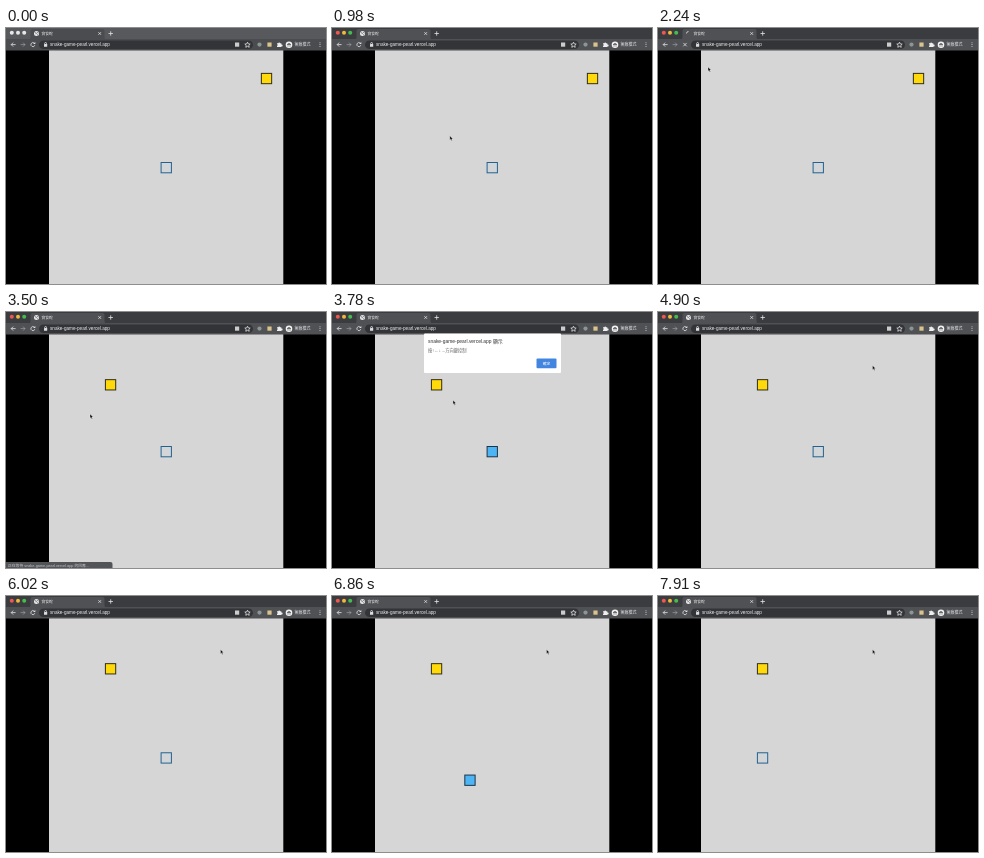
An HTML page for the animation above (8000 ms loop, 320x256 px).

```html
<!DOCTYPE html>
<html lang="zh-Hant">
<head>
<meta charset="utf-8">
<title>貪食蛇</title>
<style>
  html, body { margin: 0; width: 100%; height: 100%; overflow: hidden; background: #000; }
  svg { display: block; width: 100vw; height: 100vh; }
  text { font-family: "Liberation Sans", "Noto Sans CJK TC", "Noto Sans CJK", sans-serif; fill: #eee; }
  .line { fill: none; stroke: #e4e4e4; stroke-width: .8; }
</style>
</head>
<body>
<svg viewBox="0 0 320 256">
  <rect width="320" height="256" fill="#000"/>
  <rect x="43" y="22" width="234.3" height="234" fill="#d6d6d6"/>

  <g id="chrome">
    <rect id="frame" width="320" height="12"/>
    <path id="tab" d="M22 11.5Q24.5 11.5 24.5 9V3Q24.5 1 26.5 1H96.500Q98.500 1 98.500 3V9Q98.500 11.500 101 11.500Z"/>
    <rect id="toolbar" y="11" width="320" height="11.500"/>
    <rect x="33" y="12.500" width="214" height="8.500" rx="4.250" fill="#333438"/>
    <g id="lights"><circle cx="5.800" cy="4.800" r="2"/><circle cx="12" cy="4.800" r="2"/><circle cx="18.200" cy="4.800" r="2"/></g>
    <g id="globe">
      <circle cx="30.500" cy="5.500" r="2.500" fill="#eee"/>
      <path d="M28.800 4.600l1.600.4-.3 1.300M31 3.800l.7 1 .9.300M31 6.500l1 .6" fill="none" stroke="#55565a" stroke-width=".7"/>
    </g>
    <path id="spinner" class="line" d="M28.500 5.500A2 2 0 0 1 30.500 3.500"/>
    <text x="35.500" y="7.200" font-size="3.800">貪食蛇</text>
    <path class="line" d="M92.400 4.200l2.600 2.600m0-2.600l-2.600 2.600" stroke-width=".6"/>
    <path class="line" d="M102.500 5.500h4.400m-2.200-2.200v4.400" stroke-width=".7"/>
    <path class="line" d="M9.600 16.600H5.200m2-2l-2 2 2 2"/>
    <path class="line" d="M14.600 16.600H19m-2-2l2 2-2 2" opacity=".45"/>
    <circle id="hover" cx="27" cy="16.700" r="5" fill="#fff" opacity=".12"/>
    <g id="reload">
      <path class="line" d="M28.800 17.200A2 2 0 1 1 28.300 15.200"/>
      <path d="M29.300 13.900v2.200h-2.200z" fill="#e4e4e4"/>
    </g>
    <path id="stop" class="line" d="M25.300 14.900l3.400 3.400m0-3.400l-3.400 3.400"/>
    <rect x="38" y="16.100" width="3.200" height="2.600" rx=".3" fill="#ddd"/>
    <path d="M38.700 16.200v-.8a.9.900 0 0 1 1.800 0v.8" class="line" stroke-width=".5"/>
    <text x="44" y="18.400" font-size="4.630">snake-game-pearl.vercel.app</text>
    <rect x="229" y="14.500" width="4.200" height="4.200" fill="#ccc"/>
    <path class="line" stroke-width=".6" d="M241.500 14.200l.8 1.700 1.900.2-1.400 1.300.4 1.900-1.700-1-1.700 1 .4-1.900-1.400-1.300 1.900-.2z"/>
    <circle cx="253.500" cy="16.600" r="2.100" fill="#8b9692"/>
    <rect x="261.400" y="14.500" width="4.200" height="4.200" fill="#d9c48c"/>
    <path d="M271 15.300h1.300a.9.900 0 1 1 1.800 0h1.200v1.300a.9.900 0 1 1 0 1.600v.9H271v-1.300a.8.800 0 0 0 0-1.600z" fill="#eee"/>
    <circle cx="283" cy="16.700" r="3.300" fill="#f2f2f2"/>
    <path d="M281 16.600h4m-3.200-.9h2.400M281.500 18h1m1 0h1" stroke="#444" stroke-width=".8"/>
    <text x="288.600" y="18.200" font-size="4">無痕模式</text>
    <g fill="#ddd"><circle cx="314" cy="14.800" r=".5"/><circle cx="314" cy="16.600" r=".5"/><circle cx="314" cy="18.400" r=".5"/></g>
  </g>

  <rect id="food" width="10.300" height="10.300" fill="#ffd90a" stroke="#302c1c"/>
  <rect id="snake" width="10.300" height="10.300"/>

  <g id="status">
    <path d="M0 250H104.500Q106.500 250 106.500 252V256H0Z" fill="#535458"/>
    <text x="2" y="254.600" font-size="3.800" style="fill:#c8c8c8">正在等待 snake-game-pearl.vercel.app 的回應...</text>
  </g>

  <g id="alert">
    <rect x="92" y="21.500" width="137" height="39.500" rx="1" fill="#fff"/>
    <text x="96" y="31.300" font-size="4.920" style="fill:#333">snake-game-pearl.vercel.app 顯示</text>
    <text x="96" y="40.200" font-size="4.300" style="fill:#666">按↑←↓→方向鍵控制</text>
    <rect x="204.500" y="46.500" width="20" height="9.800" rx="1" fill="#4285e0"/>
    <text x="214.500" y="52.800" font-size="3.800" text-anchor="middle" style="fill:#fff">確定</text>
  </g>

  <path id="cursor" d="M0 0V4.300L1 3.400 1.700 5 2.500 4.700 1.800 3.100H3.100Z" fill="#111" stroke="#f4f4f4" stroke-width=".35"/>
</svg>
<script>
const LOOP = 8000, TICK = 70, CELL = 11.14, LEFT = 43.2, TOP = 22.6;
const el = id => document.getElementById(id);
const show = (id, on) => { el(id).style.display = on ? "" : "none"; };
const paint = (id, fill) => el(id).setAttribute("fill", fill);

// time, x, y of the pointer tip
const pointer = [
  [140, 200, 181], [770, 120, 110], [910, 120, 110], [1680, 27, 17],
  [2100, 27, 17], [2240, 50, 39], [2940, 84, 102], [3500, 84, 102],
  [4270, 207, 56], [4480, 207, 56], [4900, 214.5, 53.500]
];

function pointerAt(t) {
  const i = pointer.findIndex(p => p[0] > t);
  if (i < 0) return pointer[pointer.length - 1].slice(1);
  const [t0, x0, y0] = pointer[i - 1], [t1, x1, y1] = pointer[i];
  const k = (t - t0) / (t1 - t0), e = k * k * (3 - 2 * k);
  return [x0 + (x1 - x0) * e, y0 + (y1 - y0) * e];
}

// four cells down, five left, then up
function snakeAt(t) {
  const n = t < 5810 ? 0 : Math.floor((t - 5810) / 210) + 1;
  const down = Math.min(n, 4), left = Math.min(Math.max(n - 4, 0), 5);
  return [10 - left, 10 + down - Math.max(n - 9, 0)];
}

function place(id, [col, row]) {
  el(id).setAttribute("x", LEFT + col * CELL + .5);
  el(id).setAttribute("y", TOP + row * CELL + .5);
}

function draw(t) {
  const active = t >= 490, loading = t >= 1890 && t < 3150;
  const asking = t >= 3640 && t < 4620;
  const solid = asking || (t >= 6440 && t < 7280);

  paint("frame", active ? "#3b3c40" : "#58595c");
  paint("tab", active ? "#505155" : "#4b4c50");
  paint("toolbar", active ? "#505155" : "#4b4c50");
  const tones = active ? ["#f0574f", "#f0b93a", "#45bd4c"] : ["#e8e8e8", "#e8e8e8", "#e8e8e8"];
  [...el("lights").children].forEach((c, i) => c.setAttribute("fill", tones[i]));

  show("globe", !loading);
  show("spinner", loading);
  el("spinner").setAttribute("transform", `rotate(${(2240 - t) * .36} 30.5 5.5)`);
  show("reload", !loading);
  show("stop", loading);
  show("hover", t >= 1610 && t < 2170);
  show("status", t >= 2310 && t < 3640);
  show("alert", asking);

  place("food", t < 3010 ? [19, 2] : [5, 4]);
  place("snake", snakeAt(t));
  paint("snake", solid ? "#4db5f5" : "#d3d6d8");
  el("snake").setAttribute("stroke", solid ? "#1d3344" : "#23618f");

  show("cursor", t >= 140);
  if (t >= 140) {
    const [x, y] = pointerAt(Math.floor(t / TICK) * TICK);
    el("cursor").setAttribute("transform", `translate(${x} ${y})`);
  }
}

function loop(now) {
  draw(now % LOOP);
  requestAnimationFrame(loop);
}
draw(0);
requestAnimationFrame(loop);
</script>
</body>
</html>
```
